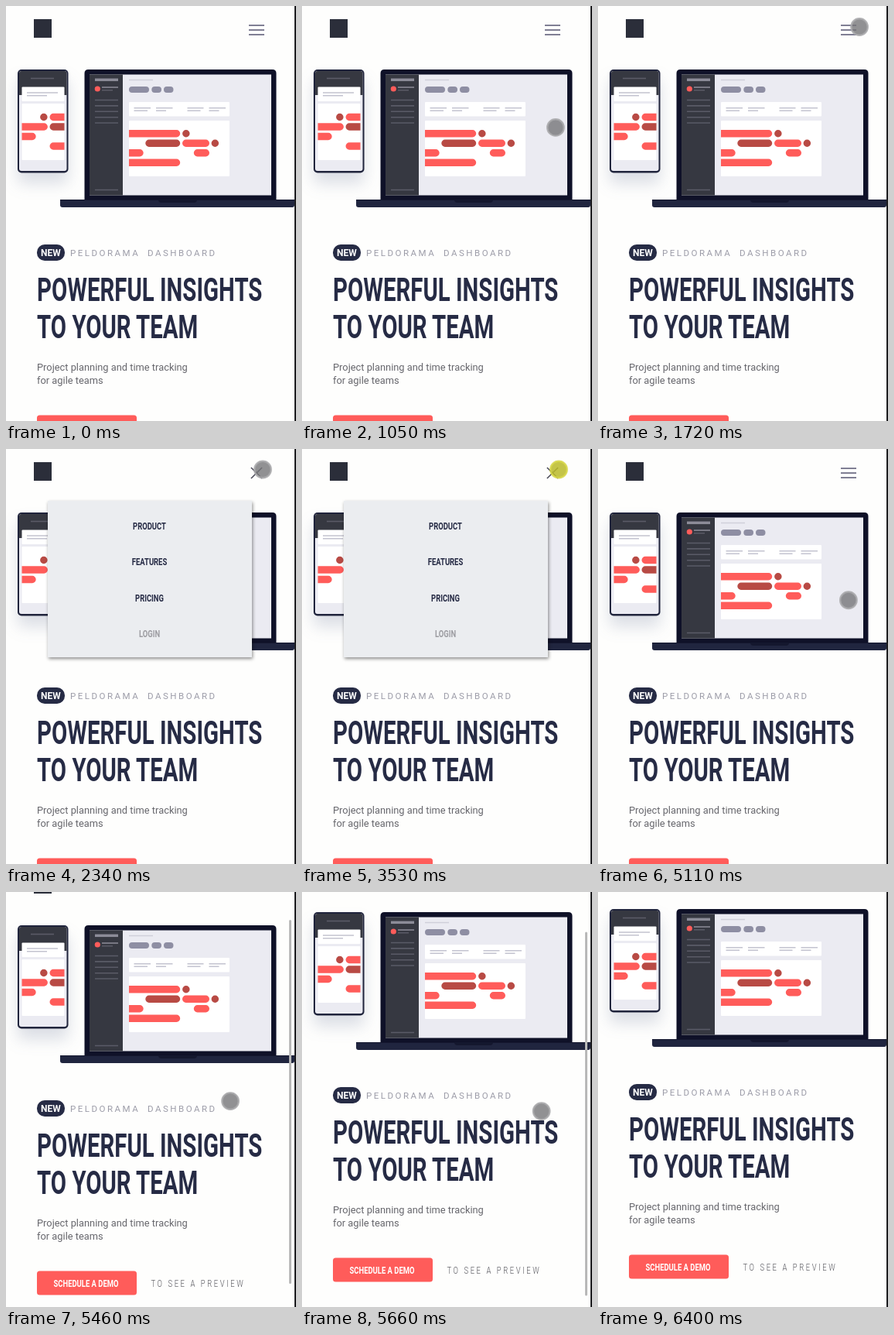
An HTML page for the animation above (6870 ms loop, 375 by 536 pixels).

```html
<!DOCTYPE html>
<html lang="en">
<head>
<meta charset="utf-8">
<title>Dashboard landing page</title>
<style>
  html, body { margin: 0; width: 100%; height: 100%; overflow: hidden; background: #fefefd; }
  #stage { display: block; width: 375px; height: 536px; font-family: Roboto, sans-serif; }
  path { fill: none; }
  .bar { stroke: #ff5c5a; stroke-width: 9.4; stroke-linecap: round; }
  .dark { stroke: #b84a44; }
  .pill { stroke: #8e8ea3; stroke-width: 8; stroke-linecap: round; }
  .rule { stroke: #c3c3d0; stroke-width: 1.5; }
  .side { stroke: #5a5b67; stroke-width: 1.6; }
  .card { fill: #fff; }
  .screen { fill: #ebebf2; }
  .panel { fill: #363841; }
  .navy { fill: #262b45; }
  .bold { font-weight: 700; }
  .small { font-size: 13.5px; }
  .eyebrow { font-size: 11.5px; letter-spacing: 2.5px; fill: #9c9ca8; }
  .copy { font-size: 12.85px; fill: #66666c; }
  .phone { filter: drop-shadow(0 14px 10px rgba(60, 75, 120, .18)); }
  #menu { filter: drop-shadow(1px 2px 2px rgba(0, 0, 0, .45)); }
  #menu text { text-anchor: middle; }
</style>
</head>
<body>
<svg id="stage" viewBox="0 0 375 536">
  <g id="page">
    <rect x="36" y="17" width="23" height="24" fill="#2b2e3a"/>

    <!-- phone -->
    <rect class="phone" x="15" y="82" width="65.5" height="133.5" rx="5" fill="#20243c"/>
    <rect class="screen" x="17" y="84" width="61.5" height="129" rx="3"/>
    <path d="M17 115V87q0-3 3-3h55.500q3 0 3 3v28z" style="fill:#363841"/>
    <path class="side" d="M32 93.500H62"/>
    <rect class="card" x="20.500" y="104.500" width="55" height="18.500" rx="1"/>
    <path class="rule" d="M27 112H67M27 115.700H53"/>
    <rect class="card" x="20.500" y="126" width="55" height="73" rx="1"/>
    <svg x="20.500" y="126" width="55" height="73" viewBox="20.500 126 55 73">
      <path class="bar" d="M61.200 143.500H80M16 156H49.200M16 168.500H34M61.200 181H80"/>
      <path class="bar dark" d="M48.800 143.500h.1M61.200 156H80"/>
    </svg>

    <!-- laptop -->
    <path d="M101.500 250V87q0-5 5-5h238q5 0 5 5v163z" style="fill:#0f1128"/>
    <rect class="screen" x="108" y="88.500" width="235" height="156"/>
    <rect class="panel" x="108" y="88.500" width="43" height="156"/>
    <path d="M70 250H373V257q0 3-3 3H73q-3 0-3-3z" style="fill:#20253f"/>
    <path d="M70 250.500H373" stroke="#14172e"/>
    <path d="M197 250h50q0 4-4 4h-42q-4 0-4-4z" style="fill:#14172e"/>

    <path d="M115 95.300H145" stroke="#8c8c98" stroke-width="3.500"/>
    <circle cx="118.300" cy="107" r="3.600" fill="#ff5c5a"/>
    <path d="M124 105H145" stroke="#8c8c98" stroke-width="1.500"/>
    <path class="side" d="M124 108.700H138M115 121.500h30m-30 7.400h30m-30 7.400h30m-30 7.400h30m-30 7.300h30M115 237.500h30"/>
    <path class="rule" d="M159 95.500H190" opacity=".7"/>
    <path class="pill" d="M163 108H181M192.300 108H197M208 108H212.500"/>
    <rect class="card" x="159" y="124" width="130" height="18.500" rx="1"/>
    <path class="rule" d="M165.500 131.700h21.500m7 0h21.500m19 0h21m7 0h21.500M165.500 135.300h17.500m11 0h13m27.500 0h17m11 0h13"/>
    <rect class="card" x="159" y="148" width="130" height="72" rx="1"/>
    <svg x="159" y="148" width="130" height="72" viewBox="159 148 130 72">
      <path class="bar" d="M154 164.700H220.500M232.700 177.200H258.300M154 189.700H173M247.500 189.700H258.300M154 202.200H220.500"/>
      <path class="bar dark" d="M232.800 164.700h.1M185 177.200H220.500M270.300 177.200h.1"/>
    </svg>

    <!-- copy -->
    <rect class="navy" x="40" y="308" width="36" height="21" rx="10"/>
    <text class="bold" x="45" y="323" font-size="12" fill="#fff">NEW</text>
    <text class="eyebrow" x="83" y="323">PELDORAMA</text>
    <text class="eyebrow" x="183" y="323">DASHBOARD</text>
    <g class="bold navy" font-size="42">
      <text transform="translate(40 380.500) scale(.7 1)">POWERFUL INSIGHTS</text>
      <text transform="translate(40 428.500) scale(.7 1)">TO YOUR TEAM</text>
    </g>
    <text class="copy" x="40" y="471">Project planning and time tracking</text>
    <text class="copy" x="40" y="488">for agile teams</text>
    <rect x="40" y="528.500" width="129" height="31" rx="3.500" fill="#ff5c5a"/>
    <text class="bold small" transform="translate(61.500 549) scale(.7 1)" fill="#fff">SCHEDULE A DEMO</text>
    <text class="small" transform="translate(187.500 549) scale(.7 1)" font-weight="300" letter-spacing="3.700" fill="#55555c">TO SEE A PREVIEW</text>

    <!-- navigation -->
    <g id="menu">
      <rect x="54" y="67" width="264" height="202" fill="#ebedf0"/>
      <g class="bold small navy">
        <text transform="translate(185.500 104) scale(.7 1)">PRODUCT</text>
        <text transform="translate(185.500 150) scale(.7 1)">FEATURES</text>
        <text transform="translate(185.500 197) scale(.7 1)">PRICING</text>
        <text transform="translate(185.500 243) scale(.7 1)" fill="#9d9da2">LOGIN</text>
      </g>
    </g>
    <rect id="tap" x="314" y="24" width="20" height="26" fill="#b3def1"/>
    <g id="icon">
      <path d="M-10 0H10"/><path d="M-10 0H10"/><path d="M-10 0H10"/>
    </g>
  </g>

  <rect id="thumb" x="366" width="3" height="470" rx="1.500" fill="#b8b8b8"/>
  <circle id="cursor" r="10.700" stroke-width="2.400"/>
  <path d="M374 0V536" stroke="#1d1d20" stroke-width="2"/>
</svg>

<script>
const LOOP = 6870, PRESS = 70;
const toggles = [2130, 3600, 4150, 4760];   // menu opens and closes in turn
const route = [                             // time, x, y of the pointer
  [780, 388, 217], [1150, 306, 135], [1300, 305, 100], [1520, 319, 64], [1590, 319, 64],
  [1720, 338, 27], [1790, 343, 27], [1920, 332, 26.5], [4800, 332, 26.5], [4950, 353, 95],
  [5110, 324, 195], [5320, 305, 245], [5460, 290, 270], [5920, 335, 300], [6060, 335, 300],
  [6300, 390, 290]
];
const [page, menu, tap, icon, thumb, cursor] =
  ["page", "menu", "tap", "icon", "thumb", "cursor"].map(id => document.getElementById(id));
const clamp = v => Math.min(1, Math.max(0, v));
const mix = (a, b, p) => a + (b - a) * p;
const show = (el, on) => el.setAttribute("visibility", on ? "visible" : "hidden");

function pointerAt(t) {
  const i = route.findIndex(k => k[0] > t);
  if (i < 1) return [-50, -50];
  const [a, b] = [route[i - 1], route[i]];
  const p = (t - a[0]) / (b[0] - a[0]);
  return [mix(a[1], b[1], p), mix(a[2], b[2], p)];
}

function drawIcon(p) {
  [...icon.children].forEach((line, i) => {
    const side = i - 1;
    line.setAttribute("transform", `translate(324 ${31 + 6 * side * (1 - p)}) rotate(${-45 * side * p})`);
    line.setAttribute("opacity", side ? 1 : 1 - p);
  });
  icon.setAttribute("stroke", `rgb(${mix(128, 70, p)} ${mix(127, 70, p)} ${mix(148, 84, p)})`);
  icon.setAttribute("stroke-width", mix(2, 1.5, p));
}

function draw(t) {
  const scroll = t < 5340 ? 0 : t > 5920 ? 60 : Math.round(60 * (1 - Math.exp((5340 - t) / 115)));
  page.setAttribute("transform", `translate(0 ${-scroll})`);

  show(menu, toggles.filter(k => t >= k).length % 2);
  show(tap, toggles.some(k => t >= k && t < k + PRESS));
  drawIcon(toggles.reduce((p, k, i) =>
    p + (i % 2 ? -1 : 1) * clamp((t - k + PRESS) / 280), 0));

  thumb.setAttribute("y", scroll * .92);
  thumb.setAttribute("opacity", t < 5380 ? 0 : 1 - clamp((t - 6060) / 340));

  const pressed = toggles.some(k => t >= k - PRESS && t < k);
  const [x, y] = pointerAt(t);
  cursor.setAttribute("transform", `translate(${x} ${y})`);
  cursor.setAttribute("fill", pressed ? "rgba(186,186,40,.85)" : "rgba(118,118,120,.8)");
  cursor.setAttribute("stroke", pressed ? "rgba(214,214,70,.85)" : "rgba(168,168,170,.85)");
}

function tick(now) {
  draw(now % LOOP);
  requestAnimationFrame(tick);
}
draw(0);
requestAnimationFrame(tick);
</script>
</body>
</html>
```
